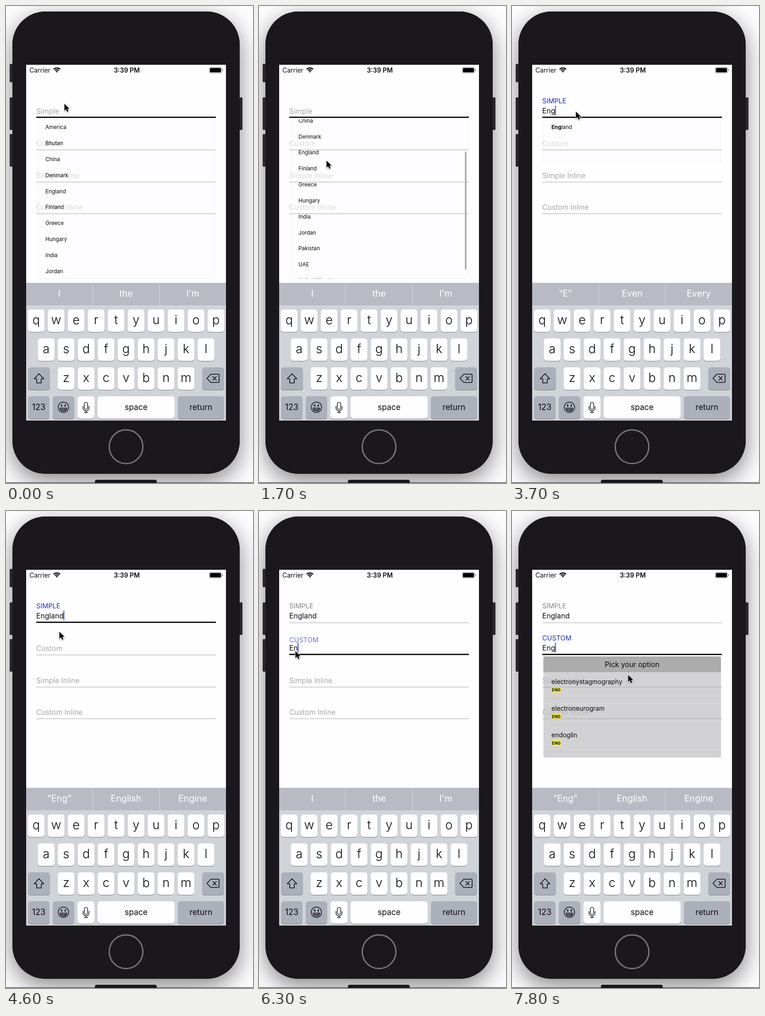
Recreate the animation shown at these times as an HTML page with a canvas. Size 539 by 1039 pixels, loop 8 s.

```html
<!DOCTYPE html>
<html lang="en">
<head>
<meta charset="utf-8">
<title>Search text field</title>
<style>
  html, body { margin: 0; width: 100%; height: 100%; overflow: hidden; background: #fdfcfe; }
  canvas { display: block; }
</style>
</head>
<body>
<canvas id="stage" width="539" height="1039"></canvas>
<script>
const ctx = document.getElementById('stage').getContext('2d');
const LOOP = 8000, TICK = 100;
const ROW = 34.84, LIST_HEIGHT = 347, FIELD_GAP = 69.8, KEY_PITCH = 43.6, CENTER = 262;
const SCREEN = '#fefdff', INK = '#0b0b0d', BODY = '#1a181c';
const TYPE_DELAY = 200, PICK = 4500, REFOCUS = 5100, OPTIONS = 7200;
const countries = ['America', 'Bhutan', 'China', 'Denmark', 'England', 'Finland', 'Greece',
  'Hungary', 'India', 'Jordan', 'Pakistan', 'UAE', 'United Kingdom'];
const SCROLL_RANGE = countries.length * ROW - LIST_HEIGHT - 1;
const fields = [
  { name: 'Simple', typedAt: 3200 },
  { name: 'Custom', typedAt: 6100 },
  { name: 'Simple Inline', typedAt: Infinity },
  { name: 'Custom Inline', typedAt: Infinity },
];
const gestures = [
  { from: 0, to: 400, x: 166, y: 432 },
  { from: 400, to: 1000, x: 164, y: 302 },
  { from: 1400, to: 2300, x: 98, y: 433 },
  { from: 3100, to: 3700, x: 139, y: 229 },
  { from: 4000, to: 4400, x: 116, y: 262 },
  { from: 4700, to: 5200, x: 79, y: 304 },
  { from: 7200, to: 7700, x: 253, y: 356 },
];

const clamp = v => Math.max(0, Math.min(1, v));
const bump = (t, peak, width) => clamp(1 - Math.abs(t - peak) / width);
const blink = t => clamp(.5 + 4 * Math.cos(t / 1000 * 2 * Math.PI));
function ease(t, from, to) {
  const u = clamp((t - from) / (to - from));
  return u * u * (3 - 2 * u);
}

function fieldValue({ typedAt }, t) {
  if (typedAt < PICK && t >= PICK) return 'England';
  return 'Eng'.slice(0, Math.max(0, Math.floor((t - typedAt) / TYPE_DELAY) + 1));
}

function predictions(sinceTyping) {
  if (sinceTyping < 300) return ['I', 'the', "I'm"];
  return sinceTyping < 800 ? ['“E”', 'Even', 'Every'] : ['“Eng”', 'English', 'Engine'];
}

function rect(x, y, w, h, color, r = 0) {
  ctx.fillStyle = color;
  ctx.beginPath();
  ctx.roundRect(x, y, w, h, r);
  ctx.fill();
}

function outline(x, y, w, h, color, r) {
  ctx.strokeStyle = color;
  ctx.lineWidth = 1;
  ctx.beginPath();
  ctx.roundRect(x, y, w, h, r);
  ctx.stroke();
}

function arc(x, y, r, width, color, from = 0, to = 2 * Math.PI) {
  ctx.strokeStyle = color;
  ctx.lineWidth = width;
  ctx.beginPath();
  ctx.arc(x, y, r, from, to);
  ctx.stroke();
}

function text(str, x, y, size, color = INK, align = 'left', weight = 400) {
  ctx.font = `${weight} ${size}px Inter, sans-serif`;
  ctx.fillStyle = color;
  ctx.textAlign = align;
  ctx.fillText(str, x, y);
  return ctx.measureText(str).width;
}

function icon(d, width = 1.6) {
  ctx.strokeStyle = INK;
  ctx.lineWidth = width;
  ctx.lineJoin = ctx.lineCap = 'round';
  ctx.stroke(new Path2D(d));
}

function faded(alpha, draw) {
  ctx.save();
  ctx.globalAlpha = alpha;
  draw();
  ctx.restore();
}

function clipped(x, y, w, h, draw) {
  ctx.save();
  ctx.beginPath();
  ctx.rect(x, y, w, h);
  ctx.clip();
  draw();
  ctx.restore();
}

function phone() {
  rect(0, 0, 539, 1039, '#fdfcfe');
  ctx.save();
  ctx.shadowColor = 'rgba(0,0,0,.48)';
  ctx.shadowBlur = 50;
  ctx.shadowOffsetY = 15;
  rect(14, 12, 496, 1007, BODY, 72);
  ctx.restore();
  rect(8, 126, 7, 40, '#29272b', 2);
  for (const [x, y] of [[8, 199], [8, 279], [509, 199]]) rect(x, y, 7, 71, '#29272b', 2);
  rect(14, 12, 496, 1007, BODY, 72);
  rect(0, 1037.5, 539, 2, '#5b595d');
  rect(194, 1032, 135, 12, BODY, 4);
  arc(CENTER, 960, 36.7, 3, '#757477');
  rect(44, 128, 436, 775, SCREEN);
}

function statusBar() {
  text('Carrier', 51, 145, 14);
  text('3:39 PM', 263.5, 145, 14, INK, 'center', 600);
  for (const r of [1.8, 6, 10]) arc(111, 145, r, r < 2 ? 3.6 : 2.4, INK, -Math.PI * .75, -Math.PI * .25);
  outline(443.5, 133.5, 27, 12.5, '#8b8b8e', 3);
  rect(445, 135, 24, 9.5, '#000', 1.5);
  rect(471.8, 137.5, 1.5, 4.5, '#8b8b8e', 1);
}

function key(x, y, w, label = '', size = 17.5, color = SCREEN) {
  rect(x, y + 1.3, w, 49, '#898b90', 6);
  rect(x, y, w, 49, color, 6);
  const isLetter = label.length === 1;
  text(label, x + w / 2, y + (isLetter ? 32 : 30), size, INK, 'center', isLetter ? 300 : 400);
}

function keyboard(words) {
  const dark = '#acb0bb';
  rect(44, 603, 436, 49, '#b8bbc4');
  rect(44, 652, 436, 251, '#d0d4d9');
  words.forEach((word, i) => {
    text(word, CENTER + (i - 1) * 145.6, 632.5, 19.6, '#fff', 'center');
    if (i) rect(42.5 + i * 146, 603, 1.2, 49, '#d0d3d9');
  });
  ['qwertyuiop', 'asdfghjkl', 'zxcvbnm'].forEach((letters, row) => {
    const left = CENTER - letters.length * KEY_PITCH / 2 + 3.5;
    [...letters].forEach((c, i) => key(left + i * KEY_PITCH, 661 + row * 63, 36.6, c, 27));
  });
  key(48, 787, 48, '', 0, dark);
  key(428, 787, 48, '', 0, dark);
  key(48, 850, 47, '123', 18, dark);
  key(102, 850, 47, '', 0, dark);
  key(156, 850, 37);
  key(200, 850, 168, 'space');
  key(375, 850, 101, 'return', 17.5, dark);

  ctx.save();
  icon('M72 801 L61.5 812 H67 V821 H77 V812 H82.5 Z');
  icon('M438.5 811 L447 802 H463 Q465 802 465 804 V818 Q465 820 463 820 H447 Z M451.5 807 l7.5 8 m0 -8 l-7.5 8');
  icon('M118 876 H132.6 Q131.5 882 125.3 882 Q119 882 118 876 Z M119 879 H131.5', 1.4);
  icon('M121.5 869 v2.5 M129.2 869 v2.5', 2.4);
  arc(125.3, 874, 11.3, 1.4, INK);
  icon('M171 867 a3.6 3.6 0 0 1 7.2 0 V875 a3.6 3.6 0 0 1 -7.2 0 Z M168 872 V875.5 a6.6 6.6 0 0 0 13.2 0 V872 M174.6 882 V885.5 M171 885.5 h7.2', 1.4);
  ctx.restore();
}

function drawField({ name, typedAt }, i, value, focused, t) {
  const y = 235 + i * FIELD_GAP;
  let width = 1;
  if (value) {
    const shown = clamp((t - typedAt) / 300);
    faded(shown, () =>
      text(name.toUpperCase(), 66, y - 9 - 14 * shown, 14.5, focused ? '#1d30b4' : '#858488'));
    width = text(value, 66, y - 1, 15.7);
  } else {
    text(name, 66, y, 15.7, '#a6a5a9');
  }
  const caret = value ? 1 : i ? blink(t - REFOCUS - 200) : t && blink(t - 30);
  if (focused) faded(caret, () => rect(65.5 + width, y - 18, 2, 21.5, '#4058d0'));
}

function fieldLine(i, focused) {
  const y = Math.round(243 + i * FIELD_GAP);
  if (focused) rect(66, y - 2, 392, 2.7, '#09090a');
  else rect(66, y, 392, 1, '#a8a7ab');
}

function countryList(t, query) {
  const height = LIST_HEIGHT - (LIST_HEIGHT - ROW) * ease(t, 3200, 3900);
  const scroll = SCROLL_RANGE * (ease(t, 400, 1000) - ease(t, 1500, 2200))
    + 5 * bump(t, 1000, 300) - 2.8 * bump(t, 2300, 300);
  const needle = query.toLowerCase();
  rect(68.5, 247, 387.5, height, 'rgba(254,253,255,.6)', 3);
  outline(68.5, 246.5, 387, height, '#f0eff1', 3);
  clipped(68, 247, 388, height, () => {
    countries.filter(c => c.toLowerCase().includes(needle)).forEach((name, i) => {
      const start = name.toLowerCase().indexOf(needle), end = start + needle.length;
      const y = 268.2 + i * ROW - scroll;
      let x = 86;
      x += text(name.slice(0, start), x, y, 11.7);
      x += text(name.slice(start, end), x, y, 11.7, INK, 'left', 700);
      text(name.slice(end), x, y, 11.7);
    });
    faded(ease(t, 400, 600) - ease(t, 2400, 2700), () =>
      rect(449.5, 250 + clamp(scroll / SCROLL_RANGE) * 83.5, 3, 257, '#9c9b9e', 1.5));
  });
}

function optionPanel(t) {
  clipped(68, 316.5, 389, 220.5 * ease(t, OPTIONS - 100, OPTIONS + 100), () => {
    rect(68.5, 316.5, 387.5, 220.5, 'rgba(194,193,195,.72)', 3);
    rect(68.5, 316.5, 387.5, 34.5, '#adacad', [3, 3, 0, 0]);
    text('Pick your option', CENTER, 339.5, 15.6, INK, 'center');
    ['electronystagmography', 'electroneurogram', 'endoglin'].forEach((word, i) => {
      const y = 377 + i * 58.2;
      text(word, 86, y, 13.8);
      rect(86, y + 6, 21, 12.5, '#f3ef49');
      text('ENG', 87, y + 15.6, 9, INK, 'left', 700);
      rect(68.5, Math.round(y + 31), 387.5, 1, '#c4c3c6');
    });
  });
}

function cursor(t) {
  let x = 127, y = 212;
  for (const move of gestures) {
    const u = ease(t, move.from, move.to);
    x += (move.x - x) * u;
    y += (move.y - y) * u;
  }
  const arrow = new Path2D('M0 0 V17.2 L4 13.6 L6.8 20 L10 18.6 L7.3 12.4 H12.6 Z');
  ctx.save();
  ctx.translate(x + .5, y + 1);
  ctx.scale(.88, .88);
  ctx.shadowColor = 'rgba(0,0,0,.35)';
  ctx.shadowBlur = 3;
  ctx.shadowOffsetY = 1.5;
  ctx.strokeStyle = '#fff';
  ctx.lineWidth = 2;
  ctx.stroke(arrow);
  ctx.shadowColor = 'transparent';
  ctx.fillStyle = '#000';
  ctx.fill(arrow);
  ctx.restore();
}

function draw(t) {
  const active = t < REFOCUS ? 0 : 1;
  phone();
  statusBar();
  fields.forEach((field, i) => drawField(field, i, fieldValue(field, t), i === active, t));
  if (t < PICK) countryList(t, fieldValue(fields[0], t));
  if (t >= OPTIONS) optionPanel(t);
  fields.forEach((_, i) => fieldLine(i, i === active));
  keyboard(predictions(t - fields[active].typedAt));
  cursor(t);
}

let lastTick = -1;
const begin = performance.now();
function frame() {
  const tick = Math.floor((performance.now() - begin) % LOOP / TICK);
  if (tick !== lastTick) draw(tick * TICK);
  lastTick = tick;
  requestAnimationFrame(frame);
}
frame();
</script>
</body>
</html>
```
